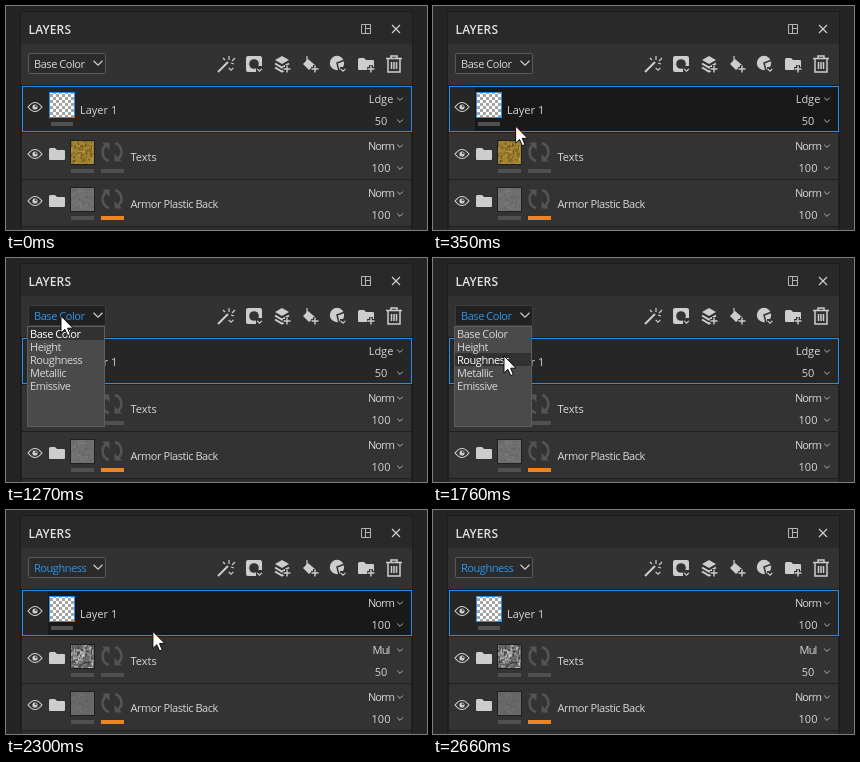
Write an HTML page that moves like this. It is 421 px wide and 224 px high and loops after 3.07 s.

```html
<!DOCTYPE html>
<html lang="en">
<head>
<meta charset="utf-8">
<title>Layers panel</title>
<style>
  html, body { margin: 0; width: 100%; height: 100%; overflow: hidden; background: #242424; }
  svg { display: block; width: 100vw; height: 100vh; }
  text { font: 11px "Open Sans", "Noto Sans", sans-serif; fill: #d6d6d6; white-space: pre; }
  .tight { letter-spacing: -.45px; }
  .mid { text-anchor: middle; }
  .title { font-size: 12px; font-weight: 600; letter-spacing: .15px; fill: #e2e2e2; }
  .line { fill: none; stroke: #cdcdcd; stroke-width: 1.2; }
  .thin { fill: none; stroke: #b4b4b4; stroke-width: 1; }
  .ico { fill: #cdcdcd; }
</style>
</head>
<body>
<svg id="stage" viewBox="0 0 421 224"></svg>
<script>
const LOOP = 3070, PICK = 2090;
const BLUE = '#2a8cec', ROW = 47;
const CHANNELS = ['Base Color', 'Height', 'Roughness', 'Metallic', 'Emissive'];

const rect = (x, y, w, h, fill, more = '') =>
  `<rect x="${x}" y="${y}" width="${w}" height="${h}" fill="${fill}" ${more}/>`;
const path = (d, more = 'class="line"') => `<path d="${d}" ${more}/>`;
const text = (x, y, s, more = '') => `<text x="${x}" y="${y}" ${more}>${s}</text>`;
const at = (x, y, s, more = '') => `<g transform="translate(${x} ${y})" ${more}>${s}</g>`;
const chevron = (x, y, r, more) => path(`M${x - r} ${y - r / 2}l${r} ${r}l${r} ${-r}`, more);
const plus = (x, y) => path(`M${x - 4} ${y}h8M${x} ${y - 4}v8`, 'stroke="#323232" stroke-width="4"') +
  path(`M${x - 3.5} ${y}h7M${x} ${y - 3.5}v7`, 'stroke="#cdcdcd" stroke-width="1.4"');

function seeded(seed) {
  return () => (seed = (seed * 16807) % 2147483647) / 2147483647;
}

// Square texture preview made of short random strokes.
function texture(seed, base, tones, count, alpha) {
  const rnd = seeded(seed);
  let s = rect(0, 0, 23, 23, base);
  for (let i = 0; i < count; i++) {
    const long = 1 + rnd() * 4, flat = rnd() < .5;
    const w = flat ? long : 1, h = flat ? 1 : long;
    s += rect((rnd() * (23 - w)).toFixed(1), (rnd() * (23 - h)).toFixed(1), w.toFixed(1), h.toFixed(1),
      tones[i % tones.length], `opacity="${alpha}"`);
  }
  return s + rect(-.5, -.5, 24, 24, 'none', 'stroke="#1f1f1f"');
}

function eye(y) {
  return at(29, y,
    path('M-7 0Q0-9 7 0Q0 9-7 0Z') + '<circle r="2.6" class="ico"/><circle cx=".8" cy="-.8" r=".9" fill="#333"/>');
}

const folder = path('M0 1.5Q0 0 1.5 0H6L8 2H15Q16 2 16 3V11Q16 12 15 12H1Q0 12 0 11Z', 'class="ico"');

const cycle = path('M-3 9A9.2 9.2 0 0 1-5-7.6M3-9A9.2 9.2 0 0 1 5 7.6', 'fill="none" stroke="#545454" stroke-width="2.6"') +
  path('M-10-9.5H-2.5V-2ZM10 9.5H2.5V2Z', 'fill="#545454"');

function toolbar() {
  const tip = (x, y) => chevron(x, y, 2.4);
  return at(220, 58,
      path('M-8 8L2-2', 'stroke="#cdcdcd" stroke-width="1.9"') +
      path('M3-8v4M-3-6l2 2M9-6l-3 3M5-1l3 1') + tip(5, 5)) +
    at(248, 58,
      path('M-6-8H6Q8-8 8-6V2H2V8H-6Q-8 8-8 6V-6Q-8-8-6-8Z', 'class="ico"') +
      '<circle r="4.8" fill="#323232"/>' + tip(5.5, 6)) +
    at(276, 58,
      path('M0-8L7-4L0 0L-7-4Z', 'class="ico"') +
      path('M-7-.5L0 3.5L7-.5M-7 3.5L0 7.5L4 5', 'class="line" style="stroke-width:2"') + plus(5, 5)) +
    at(304, 58,
      path('M-2-5L5 1L-1 6L-7 0Z', 'class="ico"') + path('M-3-8V-1') + plus(5, 5)) +
    at(332, 58,
      '<circle cx="-1" cy="-1" r="7.2" class="ico"/>' +
      path('M7-4L-1-1L1 7', 'stroke="#323232" stroke-width="1.5" fill="none"') +
      path('M2 3H9V9H2Z', 'fill="#323232"') + tip(5, 6)) +
    at(352, 52, folder) + plus(365, 63) +
    at(388, 58,
      path('M-8-5.5H8M-3-6V-8H3V-6M-6-5V8H6V-5M-2.5-2V5M0-2V5M2.5-2V5', 'class="line" style="stroke-width:1.5"'));
}

const checker = rect(44, 87, 24, 24, 'url(#check)') +
  rect(43.5, 86.5, 25, 25, 'none', `stroke="${BLUE}"`);

function settings(i) {
  const y = 97 + i * ROW;
  return text(375, y, '', `id="mode${i}" class="mid"`) + text(375, y + 22, '', `id="amt${i}" class="mid"`) +
    chevron(394, y - 4, 2.8, 'class="thin"') + chevron(394, y + 18, 2.8, 'class="thin"');
}

// Pointer highlight, right of the visibility and folder column.
function hover(i) {
  const x = i ? 61 : 42;
  return rect(x, 81 + i * ROW, 405 - x, 44, i ? '#282828' : '#191919', `id="hover${i}"`);
}

function group(i, name, bar, tight) {
  const y = 81 + i * ROW;
  return rect(16, y - 1, 389, 46, '#333') + hover(i) + eye(y + 20) +
    at(43, y + 14, folder) + at(65, y + 7, '', `id="thumb${i}"`) +
    rect(65, y + 35, 23, 4, '#505050') + at(106, y + 18, cycle) + rect(95, y + 35, 23, 4, bar) +
    text(124.5, y + 27, name, tight) + settings(i);
}

const popup = rect(21.5, 68.5, 77, 100, '#4a4a4a', 'stroke="#5e5e5e"') +
  rect(22, 69, 76, 13, '#313131', 'id="mark"') +
  CHANNELS.map((s, i) => text(24, 80 + i * 13, s, `id="item${i}" class="tight"`)).join('');

document.getElementById('stage').innerHTML =
  '<clipPath id="below"><rect x="20" y="68" width="80" height="103"/></clipPath>' +
  '<pattern id="check" x="44" y="88" width="6" height="6" patternUnits="userSpaceOnUse">' +
  rect(0, 0, 6, 6, '#fff') + rect(0, 0, 3, 3, '#a5a5a5') + rect(3, 3, 3, 3, '#a5a5a5') + '</pattern>' +
  rect(0, 0, 421, 224, '#242424') + rect(14, 5, 393, 219, '#1c1c1c') +
  rect(15, 6, 391, 218, '#323232') + rect(15, 6, 391, 32, '#292929') +
  text(22.5, 28, 'LAYERS', 'class="title"') +
  path('M355.5 18.5h9v9h-9zM359.5 18.5v9M359.5 22.5h5', 'class="thin"') +
  path('M386 19l8 8M394 19l-8 8') +
  rect(22.5, 47.5, 77, 20, '#2b2b2b', 'id="combo" rx="1"') +
  text(28, 62, '', 'id="value" class="tight"') + chevron(92, 57, 4.5) +
  toolbar() +
  rect(15, 79, 391, 145, '#1f1f1f') +
  rect(16.5, 80.5, 389, 45, '#262626', `stroke="${BLUE}"`) + hover(0) +
  eye(101) + checker + rect(45, 116, 22, 4, '#505050') + text(74, 108, 'Layer 1') + settings(0) +
  group(1, 'Texts', '#505050', '') + group(2, 'Armor Plastic Back', '#f08321', 'class="tight"') +
  rect(16, 221, 389, 3, '#2d2d2d') +
  `<g clip-path="url(#below)"><g id="popup">${popup}</g></g>` +
  at(0, 0, path('M0 0V17L3.9 13.3L6.7 19.6L9.3 18.5L6.6 12.2H12Z',
    'fill="#fff" stroke="#000" stroke-width=".9"'), 'id="cursor"');

const $ = id => document.getElementById(id);
const set = (id, attrs) => { for (const k in attrs) $(id).setAttribute(k, attrs[k]); };
const show = (id, on) => set(id, { visibility: on ? 'visible' : 'hidden' });

const looks = [
  [null, texture(11, '#a0822f', ['#5a4517', '#c3a247', '#6d571f'], 75, .75), texture(29, '#707070', ['#5c5c5c', '#828282'], 55, .6)],
  [null, texture(11, '#666', ['#303030', '#d5d5d5', '#a0a0a0'], 110, .85), texture(29, '#686868', ['#595959', '#777'], 55, .6)]
];
const modes = [[['Ldge', '50'], ['Norm', '100'], ['Norm', '100']], [['Norm', '100'], ['Mul', '50'], ['Norm', '100']]];

const clamp = v => Math.max(0, Math.min(1, v));
const mix = (a, b, k) => a + (b - a) * k;
// Pointer moves advance in 40 ms ticks.
const ticks = (t, start, length) => clamp(Math.floor((t - start) / 40 + 1e-6) * 40 / length);

function pointer(t) {
  if (t < 150 || t >= 2655) return null;
  if (t < 1270) {
    const k = 1 - (1 - ticks(t, 150, 520)) ** 2;
    return [mix(128, 55, k), mix(222, 58, k)];
  }
  if (t < PICK) {
    const k = ticks(t, 1270, 480), e = k * k * (3 - 2 * k);
    return [mix(55, 71, e), mix(58, 98, e)];
  }
  const k = ticks(t, 2100, 550);
  const curve = (a, b, c) => mix(mix(a, b, k), mix(b, c, k), k);
  return [curve(71, 201, 190), curve(98, 112, 226)];
}

let shown = -1;
function showChannel(c) {
  if (c === shown) return;
  shown = c;
  $('value').textContent = CHANNELS[c ? 2 : 0];
  modes[c].forEach(([mode, amount], i) => {
    $('mode' + i).textContent = mode;
    $('amt' + i).textContent = amount;
    $('mode' + i).style.letterSpacing = mode === 'Norm' || mode === 'Mul' ? '-.9px' : '';
    if (i) $('thumb' + i).innerHTML = looks[c][i];
  });
}

function update(t) {
  const p = pointer(t), pressed = t >= 710 && t < PICK;
  showChannel(t >= PICK ? 1 : 0);

  show('cursor', p);
  if (p) set('cursor', { transform: `translate(${p[0].toFixed(2)} ${p[1].toFixed(2)})` });

  const over = p && !pressed ? Math.floor((p[1] - 80) / ROW) : -1;
  for (let i = 0; i < 3; i++) show('hover' + i, over === i);

  const active = pressed || (p && p[1] < 68);
  set('combo', { fill: active ? '#212121' : '#2b2b2b', stroke: active ? '#3c3c3c' : '#5a5a5a' });
  $('value').style.fill = t >= 710 ? '#2b96ee' : '';

  // The list rolls down, lower end first.
  const roll = pressed ? ticks(t, 830, 160) : 0;
  show('popup', roll);
  set('popup', { transform: `translate(0 ${(roll - 1) * 102})` });
  const pick = p ? Math.max(0, Math.min(4, Math.floor((p[1] - 69.5) / 13))) : 0;
  set('mark', { y: 69 + pick * 13 });
  CHANNELS.forEach((_, i) => { $('item' + i).style.fill = i === pick ? '#fff' : ''; });
}

const begin = performance.now();
function frame() {
  update((performance.now() - begin) % LOOP);
  requestAnimationFrame(frame);
}
frame();
</script>
</body>
</html>
```
